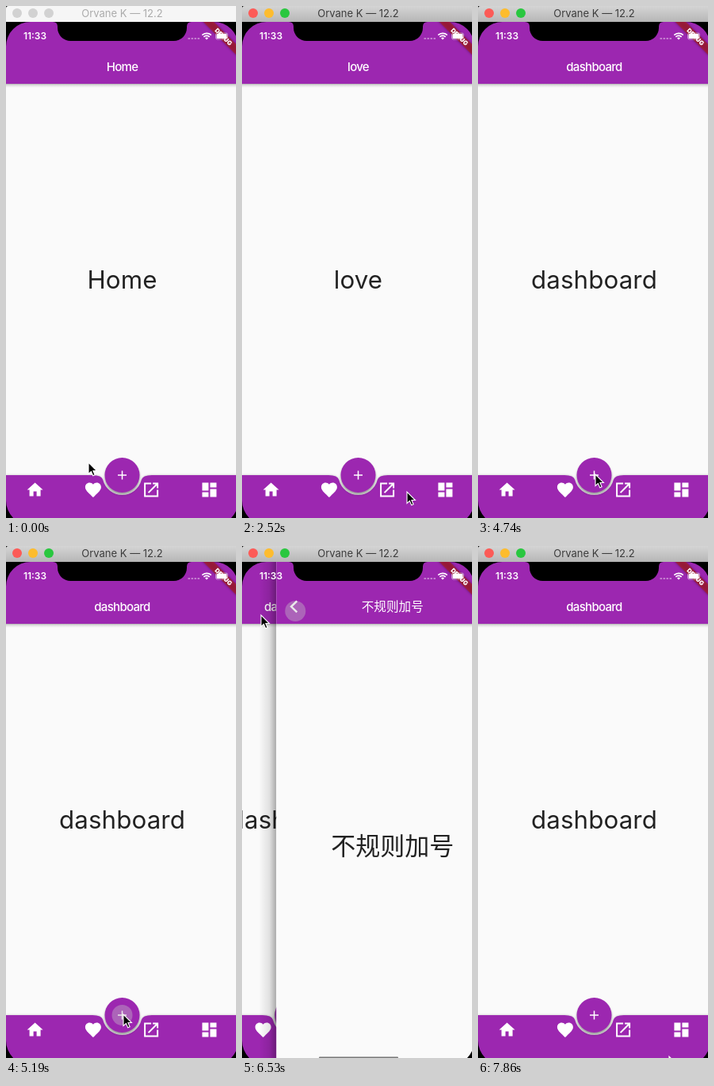
Recreate the animation shown at these times as an HTML page. Size 290 px wide and 645 px high, loop 8000 ms.

```html
<!DOCTYPE html>
<html lang="en">
<head>
<meta charset="utf-8">
<title>Notched bottom bar</title>
<style>
  html, body { margin: 0; width: 100%; height: 100%; overflow: hidden; background: #000; }
  svg { display: block; width: 290px; height: 645px; }
  text { font-family: Inter, "Noto Sans CJK SC", "Noto Sans CJK", sans-serif; text-anchor: middle; }
  .title { font-size: 15px; font-weight: 500; letter-spacing: -.7px; fill: #fff; }
  .body { font-size: 31.25px; letter-spacing: .15px; fill: #222; }
  .cjk { font-family: "Noto Sans CJK SC", "Noto Sans CJK", sans-serif; letter-spacing: 0; }
  .title.cjk { font-size: 15.6px; }
  .body.cjk { font-size: 31px; }
</style>
</head>
<body>
<svg viewBox="0 0 290 645" xmlns="http://www.w3.org/2000/svg">
  <defs>
    <linearGradient id="chrome" x2="0" y2="1">
      <stop stop-color="#d4d4d4"/><stop offset="1" stop-color="#b6b6b6"/>
    </linearGradient>
    <linearGradient id="below" x2="0" y2="1">
      <stop stop-opacity=".28"/><stop offset=".4" stop-opacity=".1"/><stop offset="1" stop-opacity="0"/>
    </linearGradient>
    <linearGradient id="edge">
      <stop stop-opacity="0"/><stop offset=".6" stop-opacity=".1"/><stop offset="1" stop-opacity=".32"/>
    </linearGradient>
    <filter id="soft" x="-30%" y="-30%" width="160%" height="160%"><feGaussianBlur stdDeviation="1.5"/></filter>
    <g id="sheet">
      <rect y="20" width="293" height="635" fill="#fafafa"/>
      <rect y="98" width="293" height="5" fill="url(#below)"/>
      <rect y="20" width="293" height="78" fill="#9c27b0"/>
    </g>
  </defs>

  <g id="home">
    <use href="#sheet"/>
    <text id="homeTitle" class="title" x="146.5" y="82"></text>
    <text id="homeBody" class="body" x="146.5" y="356"></text>
    <path id="barShadow" opacity=".22" filter="url(#soft)"/>
    <path id="bar" fill="#9c27b0"/>
    <g fill="#fff">
      <path transform="translate(24.6 597.6)" d="M10 20v-6h4v6h5v-8h3L12 3 2 12h3v8z"/>
      <path transform="translate(97.9 597.6)" d="M12 21.35l-1.45-1.32C5.4 15.36 2 12.28 2 8.5 2 5.42 4.42 3 7.5 3c1.74 0 3.41.81 4.5 2.09C13.09 3.81 14.76 3 16.5 3 19.58 3 22 5.42 22 8.5c0 3.78-3.4 6.86-8.55 11.54z"/>
      <path transform="translate(171.1 597.6)" d="M19 19H5V5h7V3H3v18h18v-9h-2zM14 3v2h3.59l-9.83 9.83 1.41 1.41L19 6.41V10h2V3z"/>
      <path transform="translate(244.4 597.6)" d="M3 13h8V3H3zm0 8h8v-6H3zm10 0h8V11h-8zm0-18v6h8V3z"/>
    </g>
    <circle cx="146.5" cy="593.5" r="22" opacity=".38" filter="url(#soft)"/>
    <circle cx="146.5" cy="591" r="22" fill="#9c27b0"/>
    <path d="M141 591h11m-5.5-5.5v11" stroke="#fff" stroke-width="1.5"/>
    <circle id="homeRipple" fill="#c8c8c8"/>
  </g>

  <g id="page">
    <rect x="-22" y="20" width="22" height="635" fill="url(#edge)"/>
    <use href="#sheet"/>
    <path d="M26 69.3 18.8 76.3 26 83.3" fill="none" stroke="#fff" stroke-width="2.5"/>
    <text class="title cjk" lang="zh" x="146.5" y="82">不规则加号</text>
    <text class="body cjk" lang="zh" x="146.5" y="388.5">不规则加号</text>
    <circle id="pageRipple" fill="#c8c8c8"/>
  </g>

  <g id="device">
    <g transform="translate(293 20) rotate(45)">
      <rect x="-34" y="21.9" width="68" height="9.4" opacity=".4" filter="url(#soft)"/>
      <rect x="-34" y="21.9" width="68" height="9.4" fill="#b71c1c" fill-opacity=".63"/>
      <text y="29.4" font-size="7.8" font-weight="900" fill="#fff">DEBUG</text>
    </g>
    <path fill-rule="evenodd" d="M0 20H293V655H0zM31 20H262A31 31 0 0 1 293 51V623A31 31 0 0 1 262 654H31A31 31 0 0 1 0 623V51A31 31 0 0 1 31 20z"/>
    <path d="M59 20Q65 20 65 26V27.500A16.500 16.500 0 0 0 81.500 44H211.500A16.500 16.500 0 0 0 228 27.500V26Q228 20 234 20z"/>
    <text x="36.500" y="42.200" font-size="12" font-weight="600" fill="#fff">11:33</text>
    <path d="M229.500 41H244" stroke="#fff" stroke-opacity=".4" stroke-width="2" stroke-dasharray="2.500 1.500"/>
    <g fill="none" stroke="#fff" stroke-width="1.700">
      <path d="M247.300 36.700A8.200 8.200 0 0 1 258.700 36.700M249.300 39A5.200 5.200 0 0 1 256.700 39"/>
    </g>
    <path d="M253 42.500 251 40.400A2.900 2.900 0 0 1 255 40.400z" fill="#fff"/>
    <rect x="264.500" y="34" width="15" height="8" rx="2" fill="none" stroke="#fff" stroke-opacity=".5"/>
    <rect x="265.500" y="35" width="13" height="6" rx="1" fill="#fff"/>
    <path id="indicator" d="M98 644.500H196" stroke="#777" stroke-width="2" stroke-linecap="round"/>
  </g>

  <path id="chromeBar" d="M0 20V3Q0 0 3 0H290V20z"/>
  <circle class="dot" cx="14" cy="9" r="6"/>
  <circle class="dot" cx="34" cy="9" r="6"/>
  <circle class="dot" cx="54" cy="9" r="6"/>
  <text id="chromeTitle" x="146.500" y="14" font-size="13">Orvane K — 12.2</text>

  <path id="cursor" d="M0 0V14.500L3.400 11.400 5.700 16.700 8.100 15.700 5.900 10.500H10.400z" stroke="#fff" stroke-width="1.100"/>
</svg>
<script>
const LOOP = 8000, TICK = 148.3, LAST_TICK = 53, WIDTH = 293;
const $ = id => document.getElementById(id);
const set = (el, attrs) => { for (const k in attrs) el.setAttribute(k, attrs[k]); };
const clamp = u => Math.max(0, Math.min(1, u));
const easeOut = u => 1 - (1 - clamp(u)) ** 3;

// Cursor stops: tick, x, y
const stops = [
  [0, 104, 575], [3, 34, 613], [5, 34, 613], [10, 107, 611], [14.5, 107, 611],
  [17, 208, 612], [19, 181, 612], [22, 181, 612], [24, 242, 604], [25.5, 253, 606],
  [29, 253, 606], [32, 148, 590], [35.3, 148, 590], [39, 38, 102], [42, 24, 87],
  [44, 24, 87], [48, 144, 402], [49, 144, 402], [51, 213, 619], [52, 213, 619], [53, 241, 643]
];
const labels = [[29, 'dashboard'], [22, 'launch'], [15, 'love'], [0, 'Home']];
// Taps: tick, centre x, centre y, widest radius
const taps = [[14, 109.9, 610, 26.5], [21, 183.1, 610, 26.5], [28, 256.4, 610, 26.5], [35, 146.5, 591, 22]];
const backTap = [44, 24, 82, 26];
const lights = ['#fc5b57', '#fdbc2e', '#29c73f'];

// Circular notch with smoothed shoulders
function notchedBar(cx, top, r) {
  const a = r + .78, px = r * r / a, py = Math.sqrt(r * r - px * px), start = a + 11.7;
  return `M0 ${top}H${cx - start}Q${cx - a} ${top} ${cx - px} ${top + py}` +
    `A${r} ${r} 0 0 0 ${cx + px} ${top + py}Q${cx + a} ${top} ${cx + start} ${top}H${WIDTH}V655H0z`;
}

function cursorAt(n) {
  const i = Math.max(1, stops.findIndex(s => s[0] >= n));
  const [t0, x0, y0] = stops[i - 1], [t1, x1, y1] = stops[i];
  let u = clamp((n - t0) / (t1 - t0));
  u = u * u * (3 - 2 * u);
  return [x0 + (x1 - x0) * u, y0 + (y1 - y0) * u];
}

function drawRipple(el, tap, n) {
  const age = tap ? n - tap[0] : -1;
  if (age < 0 || age >= 3) return set(el, { opacity: 0 });
  set(el, { cx: tap[1], cy: tap[2], r: Math.min(tap[3], 13 + 8 * age), opacity: .38 * (1 - age / 3) });
}

function draw(time) {
  const n = Math.min(LAST_TICK, Math.floor((time % LOOP + 10) / TICK));
  const active = n >= 5;
  set($('chromeBar'), { fill: active ? 'url(#chrome)' : '#f6f6f6' });
  set($('chromeTitle'), { fill: active ? '#3c3c3c' : '#ababab' });
  document.querySelectorAll('.dot').forEach((dot, i) => set(dot, { fill: active ? lights[i] : '#d2d2d2' }));

  const label = labels.find(([from]) => n >= from)[1];
  $('homeTitle').textContent = $('homeBody').textContent = label;

  const shown = easeOut((n - 35.4) / 2.7) - easeOut((n - 43.86) / 2.7);
  set($('home'), { transform: `translate(${-shown * WIDTH / 3} 0)` });
  set($('page'), { transform: `translate(${(1 - shown) * WIDTH} 0)`, visibility: shown > 0 ? 'visible' : 'hidden' });
  set($('indicator'), { opacity: shown > .3 ? 1 : 0 });

  drawRipple($('homeRipple'), taps.find(([from]) => n >= from && n < from + 3), n);
  drawRipple($('pageRipple'), backTap, n);
  set($('cursor'), { transform: `translate(${cursorAt(n)})` });
}

const barPath = notchedBar(146.5, 591, 25);
set($('bar'), { d: barPath });
set($('barShadow'), { d: barPath });

const begin = performance.now();
function frame() {
  draw(performance.now() - begin);
  requestAnimationFrame(frame);
}
frame();
</script>
</body>
</html>
```
